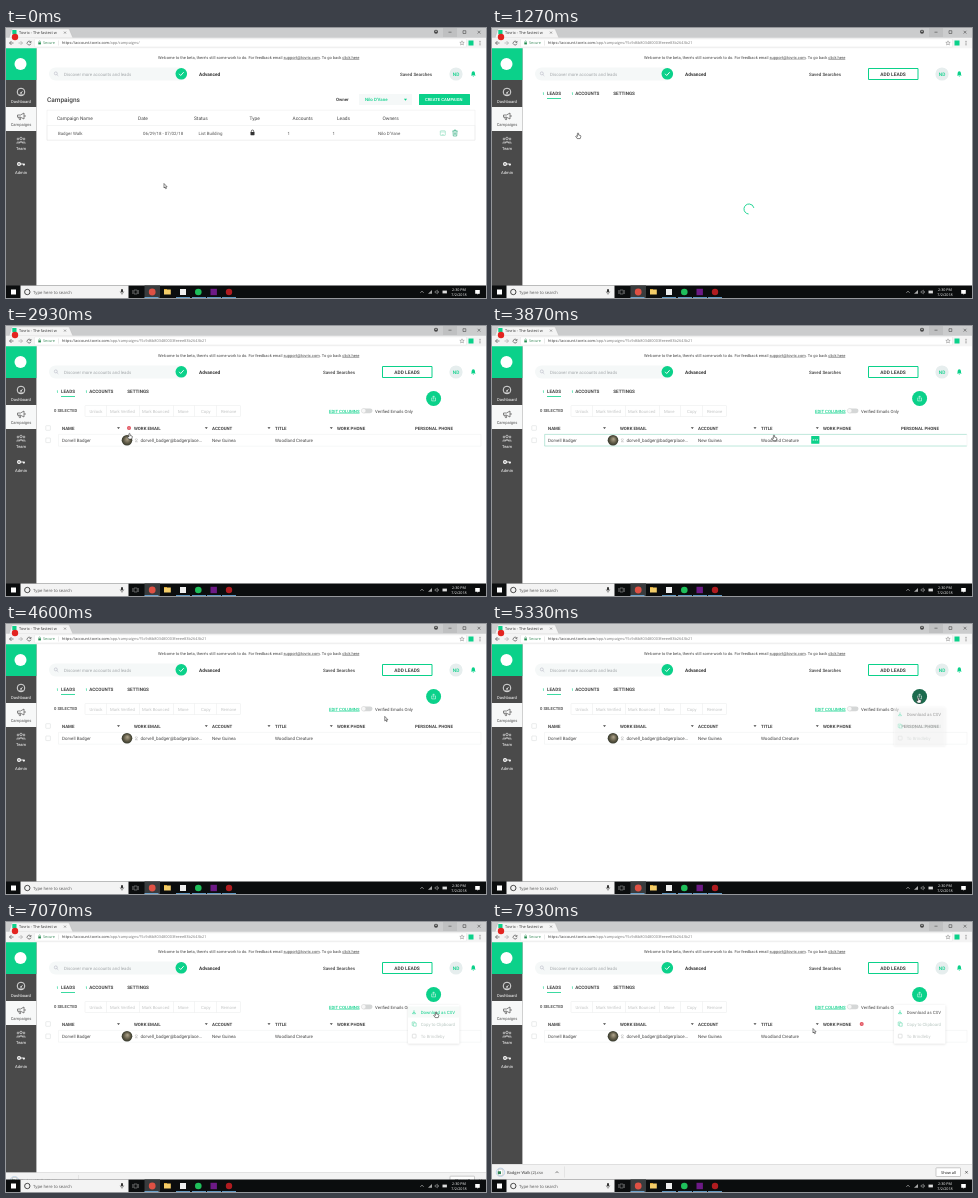
Write an HTML page with a canvas that moves like this. It is 480 px wide and 270 px high and loops after 8000 ms.

```html
<!DOCTYPE html>
<html lang="en">
<head>
<meta charset="utf-8">
<title>Campaign export</title>
<style>
html, body { margin: 0; width: 100%; height: 100%; overflow: hidden; background: #fff; }
canvas { display: block; width: 480px; height: 270px; }
</style>
</head>
<body>
<canvas id="stage"></canvas>
<script>
const LOOP = 8000;
const GREEN = '#0bd18a', DARK = '#444', GREY = '#c4c6c6', LINE = '#e9ebeb';
const canvas = document.getElementById('stage');
const ctx = canvas.getContext('2d');
const dpr = window.devicePixelRatio || 1;
canvas.width = 480 * dpr;
canvas.height = 270 * dpr;

// Drawing helpers
function box(x, y, w, h, fill, stroke, radius = 0, width = 0.5) {
  ctx.beginPath();
  ctx.roundRect(x, y, w, h, radius);
  if (fill) { ctx.fillStyle = fill; ctx.fill(); }
  if (stroke) { ctx.strokeStyle = stroke; ctx.lineWidth = width; ctx.stroke(); }
}
function dot(x, y, r, fill, stroke, width = 0.6) {
  box(x - r, y - r, 2 * r, 2 * r, fill, stroke, r, width);
}
function path(d, x, y, stroke, width = 0.7, fill) {
  ctx.save();
  ctx.translate(x, y);
  const shape = new Path2D(d);
  if (fill) { ctx.fillStyle = fill; ctx.fill(shape); }
  if (stroke) { ctx.strokeStyle = stroke; ctx.lineWidth = width; ctx.stroke(shape); }
  ctx.restore();
}
// y is the middle of the capitals
function text(str, x, y, size = 4.4, color = DARK, weight = 400, family = 'Roboto') {
  ctx.font = `${weight} ${size}px ${family}, sans-serif`;
  ctx.fillStyle = color;
  ctx.fillText(str, x, y + size * 0.355);
  return x + ctx.measureText(str).width;
}
function link(str, x, y, size, color, weight) {
  const end = text(str, x, y, size, color, weight);
  box(x, y + size * 0.5, end - x, 0.4, color);
  return end;
}
const ui = (str, x, y, size, color) => text(str, x, y, size, color, 400, '"Open Sans"');
function faded(alpha, draw) {
  if (alpha <= 0) return;
  ctx.save();
  ctx.globalAlpha *= alpha;
  draw();
  ctx.restore();
}

// Timing helpers
const ramp = (t, from, to) => Math.min(1, Math.max(0, (t - from) / (to - from)));
const ease = p => p * p * (3 - 2 * p);
const within = (t, from, to) => t >= from && t < to;

// [time, x, y] stops of the pointer tip
const route = [
  [0, 158, 155.5], [70, 158, 155.5], [870, 88, 107], [1130, 86, 105], [1300, 86, 105],
  [1930, 96, 109], [2300, 100, 109], [2930, 123.5, 107.5], [3000, 125, 109],
  [3800, 280, 109.5], [3900, 282.5, 109], [4670, 381, 92], [5130, 426.5, 73.5],
  [5870, 426.5, 73.5], [6450, 430, 90], [7580, 430, 90], [7930, 321, 106.5], [8000, 312, 108]
];
function pointerAt(t) {
  const i = Math.max(1, route.findIndex(stop => stop[0] > t));
  const [t0, x0, y0] = route[i - 1], [t1, x1, y1] = route[i];
  const p = ease(ramp(t, t0, t1));
  return [x0 + (x1 - x0) * p, y0 + (y1 - y0) * p];
}

function drawBrowser(t) {
  const onLeads = t >= 1270;
  box(0, 0, 480, 10, '#cbcccd');
  box(437, 0, 14, 9, '#bfc0c1');
  path('M3 10 L6 .8 H63 L67 10 Z', 0, 0, '#b3b3b3', 0.4, '#f4f4f4');
  box(6.3, 2, 4.2, 4.2, GREEN);
  ui('Tovrix - The fastest w', 13, 4.6, 3.9, '#333');
  path('M-1 -1 L1 1 M1 -1 L-1 1', 59, 4.6, '#555', 0.5);
  dot(430, 3.8, 2, '#444');
  dot(430, 3.2, 0.8, '#cbcccd');
  path('M-1.5 0 H1.5', 444, 4.2, '#333', 0.5);
  box(457, 2.7, 2.8, 2.8, null, '#333', 0, 0.5);
  path('M-1.4 -1.4 L1.4 1.4 M1.4 -1.4 L-1.4 1.4', 473, 4.2, '#333', 0.5);

  box(0, 9.8, 480, 10.4, '#f4f4f4');
  box(28.5, 10.8, 432, 8.2, '#fff', '#ddd', 1, 0.4);
  path('M2 0 H-2 M0 -2 L-2 0 L0 2', 5.5, 15, '#555');
  path('M-2 0 H2 M0 -2 L2 0 L0 2', 14.5, 15, '#aaa');
  path('M1.6 -1 A1.9 1.9 0 1 0 1.9 .6 M2 -2 V-.6 H.4', 23, 15, '#555');
  box(32.3, 14.4, 2.6, 2, '#238b4e');
  path('M-.8 0 V-.8 A.8 .8 0 0 1 .8 -.8 V0', 33.6, 14.4, '#238b4e', 0.4);
  ui('Secure', 37, 15, 3.8, '#3b8a5b');
  box(52.5, 12.5, 0.4, 5, '#ccc');
  const end = ui('https://account.tovrix.com', 56, 15, 3.85, '#333');
  ui('/app/campaigns/' + (onLeads ? '?5c9d6b803480003feeee83b2643b21' : ''), end, 15, 3.85, '#777');
  path('M0 -2.2 L.6 -.7 L2.2 -.6 L1 .4 L1.4 2 L0 1.1 L-1.4 2 L-1 .4 L-2.2 -.6 L-.6 -.7 Z', 456, 15, '#666', 0.4);
  box(462.5, 12.5, 5, 5, GREEN);
  for (const y of [13.3, 15, 16.7]) dot(474, y, 0.5, '#555');
  dot(9, 9, 3.2, '#e32420');
}

function drawSidebar() {
  box(0, 20, 30.4, 238, '#4a4a4a');
  box(0, 20, 30.4, 32, GREEN);
  dot(14.5, 36, 6, '#fff');
  box(0, 79, 30.4, 24, '#f7f8f8');
  dot(15, 64, 3.8, null, '#fff', 0.8);
  dot(15, 65, 0.8, '#fff');
  path('M0 0 L1.6 -2 M-2 1.8 H2', 15, 65, '#fff', 0.6);
  path('M-3.5 -1 H-.5 L3 -3 V3 L-.5 1.2 H-3.5 Z M-2.3 1.2 L-1.6 3.6 H-.4 L-.8 1.2 M4 -1 V1', 15, 88, '#555', 0.7);
  for (const [x, y, r] of [[12, 111, 0.9], [18, 111, 0.9], [15, 110.4, 1.2]]) {
    dot(x, y, r, null, '#eee');
    path(`M${-1.6 * r} 2 Q0 -.8 ${1.6 * r} 2 Z`, x, y + 2, '#eee', 0.5);
  }
  dot(13, 136, 1.4, null, '#fff', 1.2);
  path('M0 0 H4.2 M3 0 V1.5 M3.9 0 V1.4', 14.5, 136, '#fff', 0.9);
  ctx.textAlign = 'center';
  text('Dashboard', 15, 73.3, 4.1, '#fff');
  text('Campaigns', 15, 97, 4.1, '#555');
  text('Team', 15, 120.5, 4.1, '#fff');
  text('Admin', 15, 144.3, 4.1, '#fff');
  ctx.textAlign = 'left';
}

function drawPageHeader(onLeads) {
  let x = text("Welcome to the beta, there's still some work to do. For feedback email ", 152, 29.2, 4.03);
  x = link('support@tovrix.com', x, 29.2, 4.03, DARK);
  x = text('. To go back ', x, 29.2, 4.03);
  link('click here', x, 29.2, 4.03, DARK);
  box(43, 39.5, 138, 13, '#f5f8f8', null, 6.5);
  dot(49.8, 45.4, 1.5, null, '#aab', 0.5);
  path('M0 0 L1.4 1.4', 50.9, 46.5, '#aab', 0.5);
  text('Discover more accounts and leads', 58, 46, 4.4, '#a3a7aa');
  dot(175.3, 45.8, 5.8, GREEN);
  path('M-2.2 0 L-.6 1.7 L2.4 -1.6', 175.3, 45.8, '#fff', 0.9);
  text('Advanced', 193, 46, 4.75, '#333', 700);
  text('Saved Searches', onLeads ? 317 : 394, 46, 4.5, DARK, 500);
  if (onLeads) {
    box(376.5, 40.5, 49.5, 11, '#fff', GREEN, 0, 1);
    text('ADD LEADS', 388.3, 46, 4.85, DARK, 700);
  }
  dot(450, 46, 6.6, '#e6eeee');
  ctx.textAlign = 'center';
  text('ND', 450, 46, 4.8, GREEN, 500);
  ctx.textAlign = 'left';
  path('M-2.4 1.5 L-1.7 .6 V-.8 Q-1.6 -2.6 0 -2.8 Q1.6 -2.6 1.7 -.8 V.6 L2.4 1.5 Z M-.7 2 H.7 L0 2.8 Z', 467.3, 46, null, 0, GREEN);
}

function drawCampaigns(t) {
  text('Campaigns', 41, 71.5, 6.5, DARK, 500);
  text('Owner', 330, 71.5, 4.4, DARK, 700);
  box(353, 66, 53, 11, '#f5f8f8');
  text("Nilo D'Vane", 359, 71.5, 4.4, GREEN, 500);
  path('M-1.6 -.8 H1.6 L0 1.2 Z', 399.5, 71.5, null, 0, GREEN);
  box(413, 66, 51, 11, GREEN, null, 0.5);
  text('CREATE CAMPAIGN', 419, 71.5, 4.2, '#fff', 500);

  box(41, 82.2, 428, 30, '#fff', LINE);
  const hover = ease(ramp(t, 700, 870));
  box(41, 97.5, 428, 14.7, hover ? `rgba(240,247,245,${hover})` : null, LINE);
  const headings = { 'Campaign Name': 51, Date: 132, Status: 188, Type: 243.5, Accounts: 286.5, Leads: 331, Owners: 376.5 };
  for (const [name, x] of Object.entries(headings)) text(name, x, 90, 4.8);
  const cells = [['Badger Walk', 52], ['06/29/18 - 07/02/18', 137], ['List Building', 192.5], ['1', 281.5], ['1', 326.5], ["Nilo D'Vane", 372]];
  for (const [value, x] of cells) text(value, x, 105, 4.4, '#555');
  box(244.5, 104, 4, 3.2, '#333', null, 0.4);
  path('M-1.2 0 V-1 A1.2 1.2 0 0 1 1.2 -1 V0', 246.5, 104.2, '#333', 0.7);
  box(434.3, 102.8, 5, 4.6, null, '#8bdcbc', 0.5, 0.6);
  path('M0 0 H5 M1.5 2.6 H3.5', 434.3, 104, '#8bdcbc', 0.5);
  path('M-2.6 -2 H2.6 M-.8 -2 V-3 H.8 V-2 M-2 -2 L-1.7 3 H1.7 L2 -2 M-.6 -.6 V1.8 M.6 -.6 V1.8', 449, 105, '#27a87a', 0.6);
}

function drawLeadsToolbar() {
  text('0 SELECTED', 48, 85, 4.2, DARK, 500);
  box(79, 79.5, 155.5, 11, null, LINE, 0.5);
  for (const x of [100, 133, 167, 188, 210]) box(x, 79.5, 0.5, 11, LINE);
  const actions = [['Unlock', 83.5], ['Mark Verified', 104], ['Mark Bounced', 136], ['Move', 172], ['Copy', 195], ['Remove', 215]];
  for (const [name, x] of actions) text(name, x, 85, 4.25, GREY);
  link('EDIT COLUMNS', 323, 85, 4.35, GREEN, 500);
  box(355.5, 82.4, 11, 4.8, '#d5d7d7', null, 2.4);
  dot(357.6, 84.8, 2.3, '#f7f7f7', '#ccc', 0.4);
  text('Verified Emails Only', 369, 85, 4.3);
}

function drawAvatar() {
  const fur = ctx.createRadialGradient(121.5, 113, 0.5, 121, 114.3, 5.3);
  fur.addColorStop(0, '#a59b83');
  fur.addColorStop(0.6, '#5f5a46');
  fur.addColorStop(1, '#34382c');
  dot(121, 114.3, 5.3, fur);
}

function drawLeadsTable(t) {
  const rowHover = ease(ramp(t, 2980, 3100)) * (1 - ramp(t, 4080, 4200));
  const checkbox = y => box(39.8, y - 2.3, 4.6, 4.6, '#fff', '#d5d8d8', 0.4);
  checkbox(102);
  checkbox(114.3);
  const headings = { NAME: 56, 'WORK EMAIL': 128, ACCOUNT: 206, TITLE: 269, 'WORK PHONE': 331, 'PERSONAL PHONE': 409 };
  for (const [name, x] of Object.entries(headings)) text(name, x, 102, 4.4, DARK, 700);
  for (const x of [112.5, 200.3, 263, 325.3]) path('M-1.5 -.8 H1.5 L0 1 Z', x, 102, null, 0, '#444');
  for (const [x, from, to] of [[123, 2700, 3060], [369.7, 7800, LOOP]]) {
    if (!within(t, from, to)) continue;
    dot(x, 102, 2, '#e2505c');
    path('M-.8 0 H.8', x, 102, '#fff', 0.5);
  }
  box(52.5, 108.4, 422.5, 11.8, '#fff', LINE, 0, 0.4);
  faded(rowHover, () => {
    path('M422 0 H0 V11.6 H422', 52.7, 108.4, '#9adfc9', 0.6);
    box(319.2, 110, 8.2, 7.8, GREEN, null, 0.5);
    for (const x of [321.3, 323.3, 325.3]) dot(x, 113.9, 0.65, '#fff');
  });
  text('Dorvell Badger', 56, 114.4, 4.45);
  faded(ramp(t, 2000, 2230), drawAvatar);
  path('M-1.2 1.5 H1.2 M0 -1.6 A1 1 0 1 0 .1 -1.6 M-1.2 1.5 Q0 -.5 1.2 1.5', 130.3, 114.3, '#aaa', 0.4);
  text('dorvell_badger@badgerplace...', 134.5, 114.4, 4.5);
  text('New Guinea', 206, 114.4, 4.45);
  text('Woodland Creature', 269, 114.4, 4.45);
}

function drawMenu(t) {
  faded(ease(ramp(t, 5200, 5450)), () => {
    ctx.save();
    ctx.shadowColor = 'rgba(0,0,0,.14)';
    ctx.shadowBlur = 2.5 * dpr;
    ctx.shadowOffsetY = dpr * 0.5;
    box(402, 83, 51.5, 38.7, '#fff', null, 0.6);
    ctx.restore();
    const hovered = within(t, 6300, 7650);
    if (hovered) box(402, 84.5, 51.5, 11, '#f6faf8');
    path('M0 -1.7 V.8 M-.9 0 L0 .9 L.9 0 M-1.5 .8 V1.7 H1.5 V.8', 408, 90, GREEN, 0.5);
    text('Download as CSV', 414.7, 90, 4.35, hovered ? GREEN : '#555');
    box(406.2, 100, 2.8, 3.4, null, '#6fdcb4', 0, 0.6);
    box(407.4, 101, 2.8, 3.2, '#fff', '#6fdcb4', 0, 0.6);
    text('Copy to Clipboard', 414.7, 102.2, 4.35, '#b9c8c2');
    box(406.3, 112.2, 3.8, 3.8, null, GREY, 0.6);
    text('To Brindleby', 414.7, 114.2, 4.35, '#c6cbc9');
  });
}

function drawLeads(t) {
  text('1', 50.5, 66, 3.6, GREEN, 700);
  text('LEADS', 55, 65.6, 4.6, DARK, 700);
  box(55, 70, 14, 0.8, GREEN);
  text('1', 79.5, 66, 3.6, GREEN, 700);
  text('ACCOUNTS', 83.2, 65.6, 4.6, DARK, 700);
  text('SETTINGS', 121.2, 65.6, 4.6, DARK, 700);
  const shown = ramp(t, 1750, 2230);
  faded(Math.min(1, shown * 1.4), () => {
    drawLeadsToolbar();
    dot(427.6, 72.5, 7.5, within(t, 4980, 6050) ? '#1c6b4e' : GREEN);
    path('M-.9 -.6 H-1.9 V2.4 H1.9 V-.6 H.9 M0 1 V-2.6 M-1 -1.6 L0 -2.6 L1 -1.6', 427.6, 72.5, '#fff', 0.5);
  });
  faded(shown ** 1.4, () => drawLeadsTable(t));
  faded(1 - ramp(t, 1600, 1940), () => {
    const a = t / 160;
    ctx.beginPath();
    ctx.arc(257, 181, 5, a, a + 4.4);
    ctx.strokeStyle = GREEN;
    ctx.lineWidth = 0.9;
    ctx.stroke();
  });
  drawMenu(t);
}

function drawStatus(t) {
  if (within(t, 1300, 2200)) {
    box(-1, 250.3, 160, 9, '#f1f1f1', '#ccc', 1);
    ui('Waiting for realtime.app.tovrix.io...', 1, 254, 3.5, '#444');
  }
  const rise = ease(ramp(t, 6950, 7200));
  if (!rise) return;
  ctx.save();
  ctx.translate(0, 16 * (1 - rise));
  box(0, 242, 480, 16.5, '#f3f3f3');
  box(0, 242, 480, 0.5, '#ccc');
  dot(8.5, 250.3, 4.2, null, '#a9c9e6', 0.7);
  box(6.4, 247.2, 4.4, 6.2, '#fff', '#aaa');
  box(5.8, 249.3, 3.2, 2.8, '#2d8454');
  ui('Badger Walk (2).csv', 15, 250.3, 4, '#333');
  path('M-1.5 .8 L0 -.8 L1.5 .8', 65, 250.3, '#555');
  box(72, 244.5, 0.4, 11, '#ccc');
  box(444, 245.8, 24.5, 8.7, '#fff', '#999', 0.6);
  ui('Show all', 449, 250.2, 3.9, '#111');
  path('M-1.2 -1.2 L1.2 1.2 M1.2 -1.2 L-1.2 1.2', 474.5, 250.3, '#444', 0.7);
  ctx.restore();
}

function drawTaskbar() {
  box(0, 257.4, 480, 12.6, '#0b0d0e');
  box(5, 261.5, 5, 5, '#fff');
  box(14.5, 257.4, 108, 12.6, '#f3f3f3');
  dot(21.3, 264, 2.7, null, '#222', 0.8);
  ui('Type here to search', 27, 264, 4.25, '#555');
  box(115, 261, 2, 3.6, '#333', null, 1);
  path('M-1.8 -1 Q-1.7 1.3 0 1.3 Q1.7 1.3 1.8 -1 M0 1.3 V2.6', 116, 264.2, '#333', 0.4);
  box(128, 262, 3.2, 4, null, '#aaa', 0, 0.5);
  path('M0 0 V4 M-5.5 0 V4', 132.3, 262, '#aaa', 0.5);
  box(138.5, 257.4, 15.5, 12.6, '#393c3e');
  dot(146.2, 264, 3.4, '#df5144');
  box(158, 261.5, 6.8, 5, '#f4cd68');
  box(158, 261, 3, 1, '#dba83a');
  box(174, 261, 6, 6, '#eee');
  dot(192.3, 264, 3.3, '#1fbf5b');
  box(204.5, 260.8, 6.4, 6.4, '#6d1a86');
  dot(223, 264, 3.2, '#b01c20');
  for (const x of [138.5, 170, 186, 201, 216]) box(x, 269.2, 14, 0.8, '#76b9ed');
  path('M-1.6 .8 L0 -.8 L1.6 .8', 416, 264, '#ddd', 0.6);
  path('M-2 1.8 H2 V-2 Z', 424, 264, null, 0, '#aaa');
  path('M-2 -.7 H-1 L.4 -1.8 V1.8 L-1 .7 H-2 Z M1.3 -1 Q2 0 1.3 1', 431, 264, '#ddd', 0.4);
  box(436.5, 262.6, 4.4, 2.8, '#ddd');
  ctx.textAlign = 'center';
  ui('2:30 PM', 453, 261.3, 3.7, '#fff');
  ui('7/2/2018', 453, 266.8, 3.7, '#fff');
  ctx.textAlign = 'left';
  path('M-2.3 -2 H2.3 V1.7 H1 L0 2.8 V1.7 H-2.3 Z', 471.5, 264, null, 0, '#fff');
}

function drawPointer(t) {
  const [x, y] = pointerAt(t);
  const hand = within(t, 700, 1300) || within(t, 2650, 4080) || within(t, 4980, 7650);
  const shape = hand
    ? 'M-.6 .3 Q0 -.5 .6 .3 V2 L2.5 2.5 Q3 2.8 2.8 3.6 L2.2 5.6 H-.8 L-2.3 3.4 Q-2 2.7 -1.3 3 L-.6 3.6 Z'
    : 'M0 0 V4.5 L1 3.6 L1.7 5.2 L2.4 4.9 L1.7 3.3 H3.1 Z';
  path(shape, x, y, '#222', 0.55, '#fff');
}

function draw(t) {
  const onLeads = t >= 1270;
  ctx.setTransform(dpr, 0, 0, dpr, 0, 0);
  ctx.textRendering = 'geometricPrecision';
  box(0, 0, 480, 270, '#fff');
  drawPageHeader(onLeads);
  (onLeads ? drawLeads : drawCampaigns)(t);
  drawSidebar();
  drawBrowser(t);
  drawStatus(t);
  drawTaskbar();
  drawPointer(t);
}

const start = performance.now();
function tick() {
  draw((performance.now() - start) % LOOP);
  requestAnimationFrame(tick);
}
tick();
</script>
</body>
</html>
```
